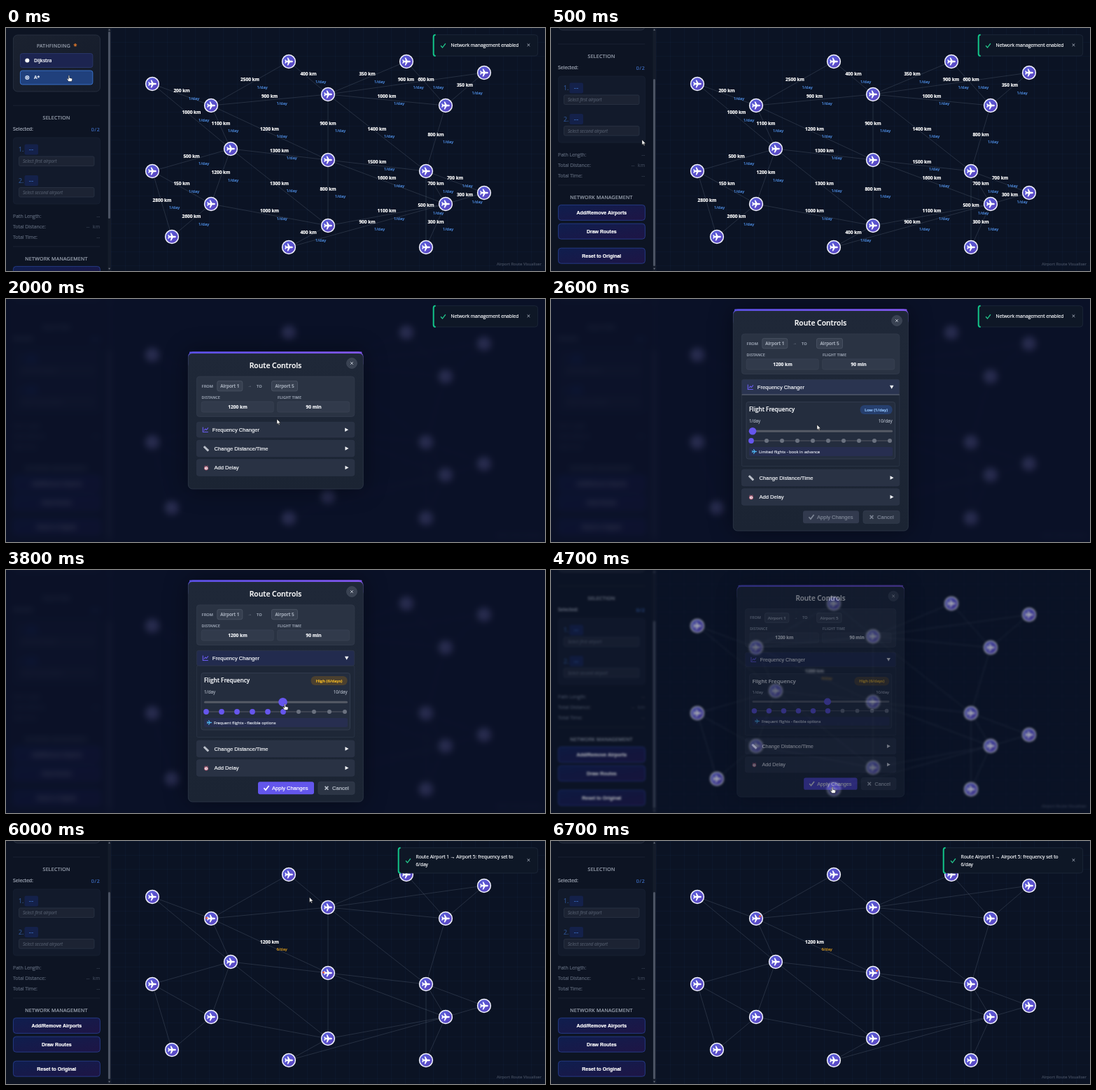
An HTML page for the animation above (6800 ms loop, 770x348 px).

```html
<!DOCTYPE html>
<html lang="en">
<head>
<meta charset="utf-8">
<title>Route network</title>
<style>
  html, body { margin: 0; width: 100%; height: 100%; overflow: hidden; background: #0b1324; }
  svg { display: block; width: 770px; height: 348px; }
  text { font-family: "Open Sans", "Noto Sans", sans-serif; white-space: pre; stroke-width: .2px; }
  .ar { font-family: "Liberation Sans", Arial, sans-serif; }
  .b { font-weight: 700; }
  .s { font-weight: 600; }
  .m { text-anchor: middle; }
  .e { text-anchor: end; }
  .i { font-style: italic; }
</style>
</head>
<body>
<svg id="stage" viewBox="0 0 770 348" xmlns="http://www.w3.org/2000/svg"></svg>
<script>
const LOOP = 6800, STEP = 100;

const nodes = [
  [209, 80], [293, 111], [404, 48], [460, 95], [572, 48], [683, 64],
  [628, 111], [321, 173], [460, 189], [209, 205], [293, 252], [237, 299],
  [460, 283], [404, 314], [600, 205], [628, 252], [683, 236], [600, 314]
];
// from, to, km
const routes = [
  [0, 1, 200], [1, 2, 2500], [2, 3, 400], [3, 4, 350], [1, 3, 900], [3, 5, 900],
  [4, 6, 600], [5, 6, 350], [3, 6, 1000], [0, 7, 1000], [1, 7, 1100], [1, 8, 1200],
  [3, 8, 900], [3, 14, 1400], [6, 14, 800], [7, 8, 1300], [7, 9, 500], [9, 10, 150],
  [7, 10, 1200], [7, 12, 1300], [9, 11, 2800], [10, 11, 2600], [10, 12, 1000],
  [8, 12, 800], [8, 14, 1500], [8, 15, 1600], [14, 16, 700], [14, 15, 700],
  [15, 16, 300], [14, 17, 500], [15, 17, 300], [12, 15, 1100], [13, 15, 900], [12, 13, 400]
];

// --- markup helpers ---
const rect = (x, y, w, h, r, fill, stroke = 'none', extra = '') =>
  `<rect x="${x}" y="${y}" width="${w}" height="${h}" rx="${r}" fill="${fill}" stroke="${stroke}" stroke-width=".8" ${extra}/>`;
const text = (x, y, str, size, fill, cls = '', extra = '') =>
  `<text x="${x}" y="${(y + size * .36).toFixed(2)}" font-size="${size}" fill="${fill}" stroke="${fill}" class="${cls}" ${extra}>${str}</text>`;
const dot = (x, y, r, fill, extra = '') => `<circle cx="${x}" cy="${y}" r="${r}" fill="${fill}" ${extra}/>`;
const line = (d, stroke, w = 1, extra = '') =>
  `<path d="${d}" fill="none" stroke="${stroke}" stroke-width="${w}" ${extra}/>`;
const group = (id, body, extra = '') => `<g id="${id}" ${extra}>${body}</g>`;
const cross = (x, y, r, stroke, w = 1) =>
  line(`M${x - r} ${y - r}l${2 * r} ${2 * r}m0 ${-2 * r}l${-2 * r} ${2 * r}`, stroke, w);
const tick = (x, y, k, stroke, w = 1.3) =>
  line(`M${x - k} ${y}l${k * .7} ${k * .8}l${k * 1.3} ${-k * 1.7}`, stroke, w);
const ramp = (id, a, b, dir = 'x2="1" y2="1"') =>
  `<linearGradient id="${id}" ${dir}><stop stop-color="${a}"/><stop offset="1" stop-color="${b}"/></linearGradient>`;
const spaced = n => `letter-spacing="${n}"`;

// --- map ---
const planePath = 'M6 0C6 .9 4.6 1.2 3.6 1.2H1.7L-.9 5.6H-2.3L-1.1 1.2H-3.4L-4.6 2.7H-5.8L-5 0L-5.8-2.7H-4.6L-3.4-1.2H-1.1L-2.3-5.6H-.9L1.7-1.2H3.6C4.6-1.2 6-.9 6 0Z';
const mid = (a, b) => [0, 1].map(k => (nodes[a][k] + nodes[b][k]) / 2);
const span = (a, b) => `M${nodes[a]}L${nodes[b]}`;

function label(a, b, km, freq, color) {
  const [x, y] = mid(a, b);
  return text(x, y - 5.8, km + ' km', 6.5, '#fff', 'm b') + text(x + 17.5, y + 5.2, freq, 5.8, color, 'm');
}
const airport = ([x, y]) =>
  `<g transform="translate(${x} ${y})">` + dot(0, 0, 9.4, 'url(#node)', 'stroke="#f1f2fb" stroke-width="1.5"') +
  `<path d="${planePath}" fill="#fff"/></g>`;
const glow = (id, a, b) => group(id,
  line(span(a, b), '#3b82f6', 9, 'opacity=".55" style="filter:blur(2.5px)"') + line(span(a, b), '#5c9ff2', 4.6));

const map = rect(150, 0, 620, 348, 0, 'url(#grid)') +
  line(routes.map(r => span(r[0], r[1])).join(''), '#94a3b8', .9, 'opacity=".22"') +
  glow('glowA', 1, 8) + glow('glowB', 7, 8) +
  nodes.map(airport).join('') +
  group('sparks', dot(0, 0, 1.5, '#f0653f', 'class="spark"') + dot(0, 0, 1.5, '#f0653f', 'class="spark"')) +
  group('labels', routes.map(r => label(...r, '1/day', '#4f8fe6')).join('')) +
  group('newLabel', label(1, 8, 1200, '6/day', '#d99a1c')) +
  text(765, 338, 'Airport Route Visualiser', 5.6, '#3b4456', 'e s');

// --- sidebar, in unscrolled coordinates ---
const option = (y, name, on) =>
  rect(20.4, y, 103.5, 20, 3, on ? '#20407c' : '#1c2450', on ? '#3f7fe0' : '#2c3a72') +
  dot(30.3, y + 10, 3, on ? '#dbe7fb' : '#fff') + (on ? dot(30.3, y + 10, 1.8, '#2a4a86') + dot(30.3, y + 10, 1.1, '#fff') : '') +
  text(40, y + 10, name, 6.8, '#f3f5fa', 's');
const slot = (y, n, hint) =>
  text(18, y, n + '.', 8.6, '#2f5596') + rect(26.5, y - 7.5, 19.5, 15, 2, '#14214a') +
  text(36.3, y, '--', 9, '#3563b0', 'm s', spaced(.6)) +
  rect(18.5, y + 10, 107.5, 13.5, 2, '#1c2333', '#2a3345') + text(24, y + 17, hint, 6.2, '#4d5667', 'i');
const stat = (y, name, value) => text(10, y, name, 6.9, '#5b6577') + text(134.5, y, value, 6.6, '#3c4557', 'e', spaced(.4));
const button = (y, name) =>
  rect(10.4, y, 124, 22, 4, 'url(#btn)', '#2a4296') + text(72.3, y + 11, name, 7, '#fff', 'ar b m');
const head = (y, name) => text(72, y, name, 7, '#a3abb9', 'm', spaced(.3));
const rule = y => line(`M10 ${y}H134`, '#1c2537', .8);

const sidebar = rect(0, 0, 150, 348, 0, '#0d1423') + group('scroller',
  rect(10.4, 10, 124, 81, 6, 'url(#card)', '#2b3445') +
  text(68, 25.2, 'PATHFINDING', 6.8, '#a3abb9', 'm', spaced(.4)) + text(99, 25.5, '*', 9, '#e0792b', 'm b') +
  option(36.5, 'Dijkstra', false) + option(61, 'A*', true) +
  rule(111) + head(128.5, 'SELECTION') +
  text(10, 145, 'Selected:', 6.9, '#aab2c0') + text(134.5, 145, '0/2', 7, '#3f6dc0', 'e', spaced(.7)) +
  rect(10.4, 157, 124, 95, 4, '#121a2b', '#182134') +
  slot(174, 1, 'Select first airport') + slot(218.5, 2, 'Select second airport') +
  stat(270, 'Path Length:', '--') + stat(284.7, 'Total Distance:', '--  km') + stat(299.2, 'Total Time:', '--') +
  rule(313) + head(330, 'NETWORK MANAGEMENT') +
  button(341.4, 'Add/Remove Airports') + button(368.2, 'Draw Routes') + button(403.2, 'Reset to Original')) +
  rect(145.5, 0, 4.5, 348, 0, '#151c2b') + rect(146, 5, 3, 268, 1.5, '#4b5363', 'none', 'id="thumb"') +
  '<path d="M147.6 1.2l1.5 2.2h-3zM147.6 346l1.5-2.2h-3z" fill="#6b7280"/>';

// --- dialog, in collapsed coordinates ---
const chip = (x, w, str) => rect(x, 117.4, w, 14.4, 2.5, '#374050', '#4d5666') + text(x + w / 2, 124.7, str, 6.4, '#a9b1be', 'm s');
const field = (x, name, value, w) =>
  text(x, 141, name, 5.2, '#98a1b0', 's', spaced(.25)) + rect(x - .3, 147, w, 15, 2.5, '#313a4b', '#3a4354') +
  text(x + w / 2, 154.6, value, 6.6, '#f4f6fa', 'm b');
const row = (y, h, x, name) => rect(272.4, y, 225.4, h, 3, '#293244', '#2e3749') +
  text(x, y + h / 2, name, 7.6, '#f2f4f8', 'ar') + `<path d="M484.5 ${y + h / 2 - 2.8}v5.6l5-2.8z" fill="#f2f4f8"/>`;
const ticks = line('M286 264H484', '#565b66', 1) +
  Array.from({ length: 10 }, (_, i) => dot(286 + 22 * i, 264, 3, '#6b7280', 'class="tick"')).join('');

const panel = rect(272.4, 198, 225.4, 102.5, 2, '#1e2737', '#2d3648') +
  rect(279, 208.5, 212.5, 81.5, 3, '#242d3e', '#364052') +
  text(283, 219.5, 'Flight Frequency', 8.2, '#f4f6fa', 's') +
  rect(441.7, 213, 46, 13, 6, '#263f6e', 'none', 'id="badge"') + text(464, 219.6, '', 6, '#93c5fd', 'm s', 'id="level"') +
  text(283, 235.4, '1/day', 6.2, '#a3abb9') + text(487.5, 235.4, '10/day', 6.2, '#a3abb9', 'e') +
  rect(283, 248.7, 205, 3, 1.5, '#565b66') + ticks + dot(288, 250.2, 5, '#6656ee', 'id="knob"') +
  rect(283, 273, 205, 13, 2, '#272e50') +
  `<path d="${planePath}" fill="#4db2ee" transform="translate(290.5 279.5) scale(.62)"/>` +
  text(297, 279.6, '', 5.8, '#d5dae4', '', 'id="hint"');

const footer = rect(360, 364.3, 80, 18, 3, '#323a4e', 'none', 'id="apply"') +
  group('applyInk', tick(372, 373.2, 3.6, 'currentColor', 1.7) + text(380, 373.3, 'Apply Changes', 7.6, 'currentColor', 'ar')) +
  rect(446, 364.3, 52, 18, 3, '#2c3545', '#333d4e') +
  group('cancelInk', cross(458, 373.3, 2.4, 'currentColor', 1.5) + text(466, 373.3, 'Cancel', 7.6, 'currentColor', 'ar'));

const dialog =
  rect(258, 74, 254, 200, 12, '#03060f', 'none', 'class="box" opacity=".6" style="filter:blur(16px)"') +
  rect(260, 75.6, 250.5, 24, 7, 'url(#bar)') +
  rect(260.3, 78, 250, 194, 6, 'url(#body)', '#2f394b', 'class="box"') +
  rect(262, 75.6, 246.5, 2.3, 1.1, 'url(#bar)') +
  text(385, 95, 'Route Controls', 10.4, '#fff', 'm s') +
  dot(494, 92, 7.5, '#394252', 'stroke="#454e5f" stroke-width=".6"') + cross(494, 92, 1.9, '#c3c9d3', .9) +
  rect(272.4, 111, 225.4, 57.5, 4, '#2a3343', '#333c4d') +
  text(279.5, 124.7, 'FROM', 5.5, '#98a1b0', 's', spaced(.2)) + chip(301.8, 36, 'Airport 1') +
  text(348, 124.5, '→', 5.5, '#737c8c', 'm') + text(358, 124.7, 'TO', 5.5, '#98a1b0', 's', spaced(.2)) + chip(379.5, 37, 'Airport 5') +
  field(279.5, 'DISTANCE', '1200 km', 103) + field(388, 'FLIGHT TIME', '90 min', 103) +
  group('panel', panel, 'clip-path="url(#fold)"') +
  rect(272.4, 176.3, 225.4, 21.7, 3, '#293244', '#2e3749', 'id="freqRow"') + text(294.8, 187.2, 'Frequency Changer', 7.6, '#f2f4f8', 'ar') +
  line('M281.3 183.5v7h7.5M282.8 188.5l2-2.4 1.6 1.4 2.4-3.2', '#6a5cf0', 1.1) +
  '<path id="arrow" d="M-2.5-2.8v5.6l5-2.8z" fill="#f2f4f8"/>' +
  line('M272.4 198H498', '#626b7b', 1, 'id="underline"') +
  group('lower',
    row(202.3, 23.4, 297.5, 'Change Distance/Time') + row(229.8, 23.4, 297.5, 'Add Delay') +
    rect(-4.5, -1.5, 9, 3, .5, '#b9bec8', 'none', 'transform="translate(286 214.3) rotate(45)"') +
    dot(286, 242.3, 2.6, '#e9dfe6', 'stroke="#b85c74" stroke-width="1"') +
    line('M283.4 239.6l1.2-1m4 1l-1.2-1M286 240.8v1.6l1 .6', '#c4637b', .7)) +
  group('footer', footer);

// --- notices and pointer ---
const notice = (id, x, y, w, h, body) => group(id,
  rect(x + 1, y, w - 1, h, 4, '#0e1726', '#1f293b') +
  line(`M${x + 4} ${y}q-3 0-3 3v${h - 6}q0 3 3 3`, '#12c489', 2) + body);
const notices =
  notice('noticeA', 609.7, 9.7, 150, 30.3, tick(624.5, 25.3, 3.4, '#22c58b') +
    text(635.5, 25, 'Network management enabled', 6.7, '#f6f8fb') + cross(746.5, 24.3, 1.8, '#aeb6c3', .9)) +
  notice('noticeB', 559.7, 9.7, 200, 36.3, tick(574.5, 28.3, 3.4, '#22c58b') +
    text(585.5, 22.8, 'Route Airport 1 → Airport 5: frequency set to', 6.7, '#f6f8fb') +
    text(585.5, 33.3, '6/day', 6.7, '#f6f8fb') + cross(746.5, 27.3, 1.8, '#aeb6c3', .9));
const pointer = group('pointer',
  '<path id="tip" d="M0 0V7.4L1.7 5.8 2.9 8.4 4 7.9 2.9 5.4H5.2Z" fill="#fff" stroke="#111" stroke-width=".5"/>' +
  '<path id="hand" d="M-.8 .6C-.8-.4 .7-.4 .7 .6V3.4L4 4.2C4.8 4.5 4.7 5.4 4.5 6.2L3.9 8.6H-.6L-2.7 5.6C-3.2 4.6-2 4.2-1.4 5L-.8 5.6Z" fill="#fff" stroke="#111" stroke-width=".5"/>');

stage.innerHTML = '<defs>' +
  ramp('node', '#5a62dd', '#5a42bd') + ramp('btn', '#0f1e4e', '#1e1545') + ramp('card', '#1b2230', '#141b2a') +
  ramp('bar', '#5b50e6', '#8257f0', '') + ramp('body', '#1f2838', '#1b2433', 'x2="0" y2="1"') +
  '<pattern id="grid" x="150" width="20" height="20" patternUnits="userSpaceOnUse"><path d="M0 20V0H20" fill="none" stroke="#3b62a8" stroke-opacity=".1"/></pattern>' +
  '<clipPath id="fold"><rect id="foldBox" x="270" y="198" width="232" height="0"/></clipPath></defs>' +
  rect(0, 0, 770, 348, 0, '#0b1324') + group('scene', map + sidebar) +
  rect(0, 0, 770, 348, 0, '#0b1128', 'none', 'id="veil"') +
  group('dialog', dialog) + notices + pointer;

// --- motion ---
const $ = id => document.getElementById(id);
const all = sel => [...document.querySelectorAll(sel)];
const boxes = all('.box').map(el => [el, +el.getAttribute('height')]);
const dots = all('.tick'), sparks = all('.spark');
const set = (id, attrs) => { for (const k in attrs) $(id).setAttribute(k, attrs[k]); };
const show = (id, v) => set(id, { opacity: v, visibility: v > 0 ? 'visible' : 'hidden' });
const move = (id, x, y) => set(id, { transform: `translate(${x} ${y})` });

// piecewise linear track of [time, value...]
function track(keys, t) {
  const n = keys.findIndex(k => k[0] > t);
  if (n < 0) return keys[keys.length - 1].slice(1);
  if (n === 0) return keys[0].slice(1);
  const a = keys[n - 1], b = keys[n], p = (t - a[0]) / (b[0] - a[0]);
  return a.slice(1).map((v, i) => v + (b[i + 1] - v) * p);
}
const fade = (a, b, t) => {
  const p = Math.min(1, Math.max(0, (t - a) / (b - a)));
  return 1 - (1 - p) ** 2;
};

const path = [
  [100, 90, 68], [300, 98, 120], [500, 130, 160], [800, 350, 166], [1000, 396, 158],
  [1800, 395, 160], [2000, 387, 172], [2200, 380, 180], [2600, 380, 180], [3100, 289, 191],
  [3200, 289, 191], [3700, 398.5, 192], [3800, 398.5, 192], [4400, 402, 311], [4700, 402, 311],
  [5000, 412, 220], [5300, 423, 161], [5900, 432, 92], [6300, 438, 46]
];
const levels = [
  ['Low', 46, '#263f6e', '#93c5fd', 'Limited flights - book in advance'],
  ['Medium', 62, '#1d4a41', '#4ade9c', 'Regular flights - good availability'],
  ['High', 52, '#4b402f', '#fbbf24', 'Frequent flights - flexible options']
];

function drawSlider(t) {
  const [x] = track([[3200, 288], [3700, 395.5]], t);
  const v = Math.round(1 + 9 * (x - 286) / 198);
  const [name, w, bg, ink, hint] = levels[v < 3 ? 0 : v < 5 ? 1 : 2];
  set('knob', { cx: x, r: t >= 3100 && t < 4000 ? 6.2 : 5.3 });
  set('badge', { x: 487.6 - w, width: w, fill: bg });
  set('level', { x: 487.6 - w / 2, fill: ink, stroke: ink });
  $('level').textContent = `${name} (${v}/day${v > 1 ? 's' : ''})`;
  $('hint').textContent = hint;
  dots.forEach((d, i) => {
    d.setAttribute('fill', i < v ? '#6656ee' : '#6b7280');
    d.setAttribute('r', i < v ? 3.9 : 3);
  });
  const ready = v > 1;
  set('apply', { fill: !ready ? '#323a4e' : t >= 4300 ? '#5648dc' : '#6356ec' });
  set('applyInk', { color: ready ? '#fff' : '#7d8595' });
  set('cancelInk', { color: ready ? '#bcc3ce' : '#7d8595' });
}

function draw(t) {
  const [scroll] = track([[100, 0], [500, 88]], t);
  move('scroller', 0, -scroll);
  set('thumb', { y: 5 + scroll * 68 / 88 });

  const open = t < 3000 ? fade(1300, 1700, t) : 1 - fade(4600, 4900, t);
  $('scene').style.filter = open > 0 ? `blur(${4 * open}px)` : 'none';
  show('veil', .8 * open);
  show('dialog', open);
  const s = .92 + .08 * open;
  const grow = fade(2400, 2600, t);
  set('dialog', { transform: `translate(385 174) scale(${s}) translate(-385 ${-174 - 61 * grow})` });
  boxes.forEach(([el, h]) => el.setAttribute('height', h + 121 * grow));
  set('foldBox', { height: 103 * grow });
  move('lower', 0, 103 * grow);
  show('footer', grow === 1 ? 1 : 0);
  show('underline', t < 3200 ? grow : 0);
  set('freqRow', { fill: t >= 3200 ? '#222b4e' : grow ? '#2a3450' : '#293244' });
  set('arrow', { transform: `translate(486.7 187.2) rotate(${90 * grow})` });
  drawSlider(t);

  show('labels', t < 3000 ? 1 - open : 0);
  show('newLabel', t >= 4600 ? 1 : 0);
  show('glowA', t < 3000 ? fade(700, 1000, t) : 0);
  show('glowB', t >= 5100 ? 1 - fade(5300, 5600, t) : 0);
  show('sparks', t >= 4900 ? 1 : 0);
  const a = (45 - 435 * (t - 5300) / 1400) * Math.PI / 180;
  sparks.forEach((el, i) => {
    const [x, y] = nodes[i ? 8 : 1];
    el.setAttribute('cx', x + 6.5 * Math.cos(a));
    el.setAttribute('cy', y + 6.5 * Math.sin(a));
  });

  const out = fade(3300, 3700, t), into = fade(4700, 5100, t);
  show('noticeA', 1 - out);
  move('noticeA', 165 * out, 0);
  show('noticeB', into);
  move('noticeB', 215 * (1 - into), 0);

  const hand = t < 300 || (t >= 3000 && t < 4000) || (t >= 4300 && t < 4800);
  move('pointer', ...track(path, t));
  show('pointer', t < 6400 ? 1 : 0);
  show('hand', hand && t < 6400 ? 1 : 0);
  show('tip', hand || t >= 6400 ? 0 : 1);
}

const start = performance.now();
let last = -1;
function tickFrame() {
  const t = Math.floor(((performance.now() - start) % LOOP) / STEP) * STEP;
  if (t !== last) draw(last = t);
  requestAnimationFrame(tickFrame);
}
tickFrame();
</script>
</body>
</html>
```
